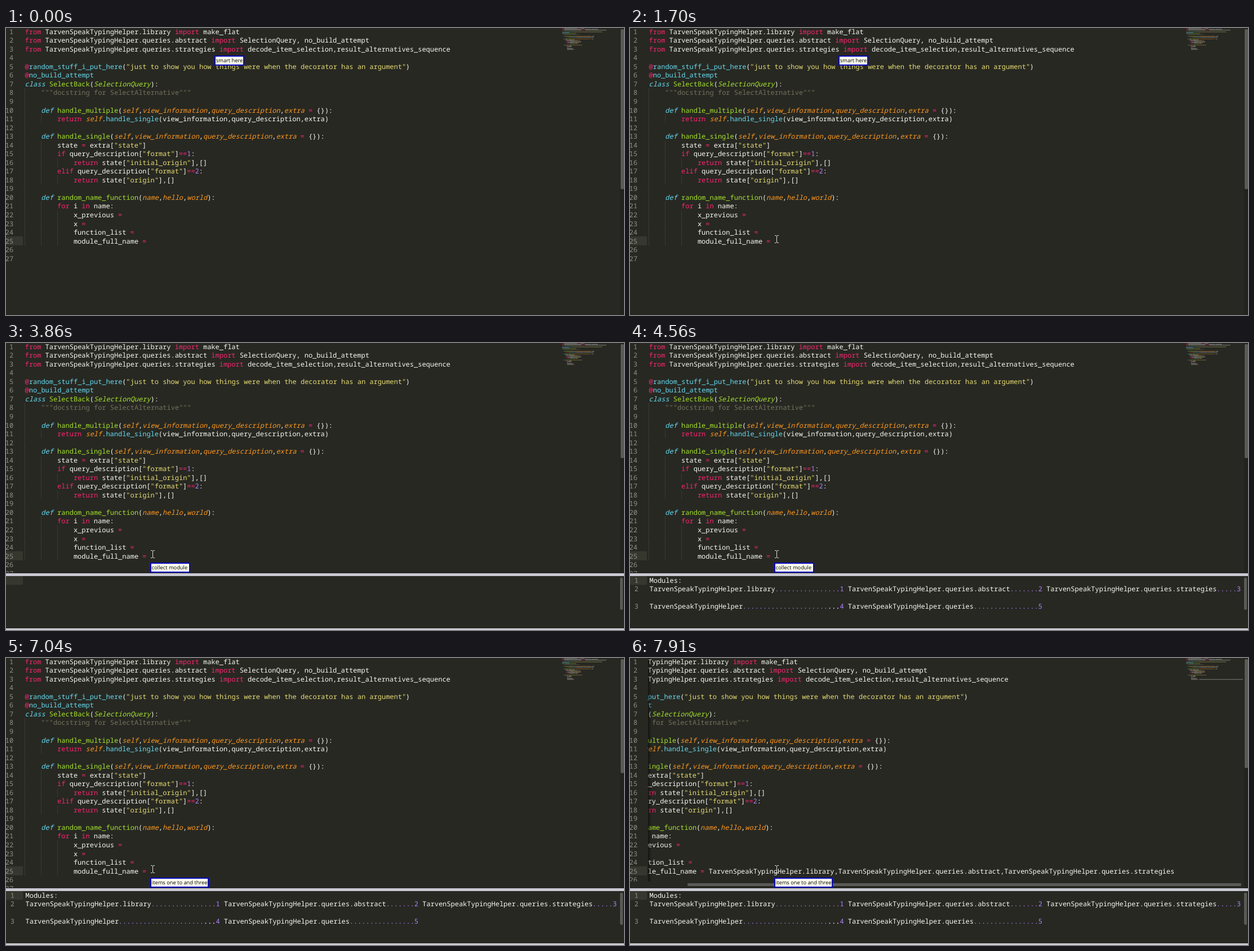
An HTML page for the animation above (8000 ms loop, 1097 by 511 pixels).

```html
<!DOCTYPE html>
<html lang="en">
<head>
<meta charset="utf-8">
<title>Editor</title>
<style>
  html, body { margin: 0; width: 100%; height: 100%; overflow: hidden; background: #272822; }
  svg { display: block; width: 100%; height: 100%; }
  text { font: 500 12px "Noto Sans Mono", "DejaVu Sans Mono", monospace; text-rendering: geometricPrecision; }
  .tip text { font: 9.3px "Open Sans", "Noto Sans", sans-serif; fill: #000; }
  .tip rect { fill: #ffffee; stroke: #0808c4; stroke-width: 2; }
  .tx { fill: #f8f8f2; }
  .kw { fill: #f92672; }
  .st { fill: #e6db74; }
  .cm { fill: #75715e; }
  .df, .cl { fill: #66d9ef; }
  .fn, .bs { fill: #a6e22e; }
  .pr { fill: #fd971f; }
  .nu { fill: #ae81ff; }
  .df, .bs, .pr { font-style: italic; }
  .num { fill: #90908a; text-anchor: end; }
  .bg { fill: #272822; }
  .active { fill: #36372f; }
  .thumb { fill: #5a5b56; }
  .bar { fill: #c9c9d3; }
  .guide { stroke: #4a4b44; stroke-dasharray: 1 1; }
  .map { opacity: .42; }
</style>
</head>
<body>
<svg id="stage" viewBox="0 0 1097 511">
  <defs>
    <clipPath id="codeClip"><rect x="31" y="0" width="956" height="511"/></clipPath>
    <clipPath id="mapClip"><rect x="987" y="0" width="101" height="60"/></clipPath>
    <linearGradient id="shade">
      <stop offset="0" stop-color="#000" stop-opacity=".5"/>
      <stop offset="1" stop-color="#000" stop-opacity="0"/>
    </linearGradient>
  </defs>
</svg>
<script>
const LOOP = 8000, CW = 7.19, ROW = 15.54, LEFT = 33.6;
const MAP_X = 987, MAP_CW = 0.75, MAP_ROW = 1.56;
const PKG = "TarvenSpeakTypingHelper";
const MODULES = [".library", ".queries.abstract", ".queries.strategies"].map(m => PKG + m);
const CODE = `from ${MODULES[0]} import make_flat
from ${MODULES[1]} import SelectionQuery, no_build_attempt
from ${MODULES[2]} import decode_item_selection,result_alternatives_sequence

@random_stuff_i_put_here("just to show you how things were when the decorator has an argument")
@no_build_attempt
class SelectBack(SelectionQuery):
    """docstring for SelectAlternative"""

    def handle_multiple(self,view_information,query_description,extra = {}):
        return self.handle_single(view_information,query_description,extra)

    def handle_single(self,view_information,query_description,extra = {}):
        state = extra["state"]
        if query_description["format"]==1:
            return state["initial_origin"],[]
        elif query_description["format"]==2:
            return state["origin"],[]

    def random_name_function(name,hello,world):
        for i in name:
            x_previous =
            x =
            function_list =
            module_full_name =

`.split("\n");
const TYPE_ROW = 24, TYPE_COL = 31;

const TOKEN = new RegExp([
  '(?<cm>""".*?""")',
  '(?<st>"[^"]*")',
  '(?<kw>\\b(?:from|import|return|if|elif|for|in)\\b|==?|@)',
  '(?<df>\\b(?:class|def)\\b)',
  '(?<fn>(?<=(?:class|def) )\\w+)',
  '(?<bs>(?<=class \\w+\\()\\w+)',
  '(?<pr>\\bself\\b|(?<=def .*[(,])\\w+)',
  '(?<cl>(?<=@|self\\.)\\w+)',
  '(?<nu>\\b\\d+\\b)',
  '(?<tx>\\w+|[^\\s\\w"@=]+)'
].join("|"), "g");

function add(parent, tag, attrs = {}, content = "") {
  const el = document.createElementNS("http://www.w3.org/2000/svg", tag);
  for (const key in attrs) el.setAttribute(key, attrs[key]);
  el.textContent = content;
  parent.appendChild(el);
  return el;
}
const group = (parent, attrs) => add(parent, "g", attrs);
const box = (parent, cls, x, y, width, height, more) =>
  add(parent, "rect", { class: cls, x, y, width, height, ...more });
const label = (parent, cls, x, y, str) => add(parent, "text", { class: cls, x, y }, str);
const show = (el, on) => el.setAttribute("visibility", on ? "visible" : "hidden");

// Baselines sit on whole pixels
const codeY = row => Math.round(10.7 + row * ROW);
const panelY = row => Math.round(426.6 + row * ROW);

// Draws one highlighted line, full size and in the overview
function drawLine(line, row, col, big, small) {
  for (const m of line.matchAll(TOKEN)) {
    const cls = Object.keys(m.groups).find(k => m.groups[k] !== undefined);
    const at = col + m.index;
    label(big, cls, LEFT + at * CW, codeY(row), m[0]);
    box(small, cls, MAP_X + at * MAP_CW, 0.2 + row * MAP_ROW, m[0].length * MAP_CW, 1);
  }
}

const stage = document.getElementById("stage");
box(stage, "bg", 0, 0, 1097, 511);

// Code pane
const codeView = group(stage, { "clip-path": "url(#codeClip)" });
const code = group(codeView);
const map = group(stage, { class: "map", "clip-path": "url(#mapClip)" });
const indentOf = row => {
  while (row < CODE.length && !CODE[row]) row++;
  return row < CODE.length ? CODE[row].search(/\S/) : 0;
};
CODE.forEach((line, row) => {
  for (let col = 0; col < indentOf(row); col += 4) {
    const x = Math.round(LEFT + col * CW) + 0.5 - (col ? 0 : 1);
    add(code, "line", { class: "guide", x1: x, x2: x, y1: codeY(row) - 12, y2: codeY(row + 1) - 12 });
  }
  drawLine(line, row, 0, code, map);
});
const typed = group(code), typedMap = group(map);
const inserted = MODULES.join(",");
drawLine(inserted, TYPE_ROW, TYPE_COL, typed, typedMap);
const caret = box(code, "tx", 0, 370, 1.5, 17);

const leftShade = box(stage, "", 32, 0, 6, 410, { fill: "url(#shade)" });
const rightShade = box(stage, "", -987, 0, 6, 410, { fill: "url(#shade)", transform: "scale(-1 1)" });

// Gutter
box(stage, "active", 0, 371, 30, 16);
CODE.forEach((_, row) => label(stage, "num", 13.2, codeY(row), row + 1));

// Scroll bars
box(stage, "", 1090, 0, 7, 511, { fill: "#22231e" });
const vThumb = box(stage, "thumb", 1091, 2, 6, 285, { rx: 2 });
const hBar = group(stage);
box(hBar, "bg", 0, 398, 1090, 12);
const hThumb = box(hBar, "thumb", 49, 401, 983, 5, { rx: 2 });

// Result panel
const panel = group(stage);
box(panel, "bg", 0, 409, 1097, 102);
box(panel, "bar", 0, 410, 1097, 5);
box(panel, "bar", 0, 508, 1097, 3);
box(panel, "active", 0, 415, 30, 15.5);
box(panel, "thumb", 1090, 418, 5, 57, { rx: 2 });
const results = group(panel);
const panelX = col => 34.5 + col * CW;
[0, 1, 3].forEach((row, i) => label(results, "num", 15, panelY(row), i + 1));
label(results, "tx", panelX(0), panelY(0), "Modules:");
function drawEntry(name, row, col, index) {
  const start = col + name.length, end = col + 47;
  label(results, "tx", panelX(col), panelY(row), name);
  label(results, "nu", panelX(start), panelY(row), ".".repeat(end - start));
  label(results, "nu", panelX(end), panelY(row), index);
}
MODULES.forEach((name, i) => drawEntry(name, 1, i * 49, i + 1));
drawEntry(PKG, 3, 0, 4);
drawEntry(PKG + ".queries", 3, 49, 5);
label(results, "tx", panelX(44), panelY(3), "...");

// Voice bubbles, status square and pointer
function bubble(str, x, y, width) {
  const g = group(stage, { class: "tip" });
  box(g, "", x + 1, y + 1, width - 2, 16);
  label(g, "", x + 2.8, y + 12, str);
  return g;
}
const bubbles = [
  { el: bubble("smart here", 370, 49, 53), from: 0, to: 2150 },
  { el: bubble("collect module", 256, 391, 71), from: 3690, to: 5330 },
  { el: bubble("items one to and three", 256, 391, 104), from: 6900, to: LOOP }
];
const badge = box(stage, "", 256, 391, 13, 13, { fill: "#fff" });
const pointer = add(stage, "path", {
  d: "M-3 -6.5H-1L.5 -5.5L2 -6.5H4M.5 -5.5V5.5M-3 6.5H-1L.5 5.5L2 6.5H4",
  fill: "none", stroke: "#dededa", "stroke-width": 1
});

// Rows are [time, value...]
const POINTER = [[70, 610, 411], [140, 414, 405], [370, 414, 405], [910, 223, 376], [1080, 223, 376], [1290, 260, 376]];
const CARET = [[0, 0], [1080, 0], [1290, 1], [1540, 1], [1700, 0], [2070, 0], [2300, 1], [2620, 1], [2770, 0],
  [3080, 0], [3400, 1], [3690, 1], [3860, 0], [3930, 0], [4010, 1], [4420, 1], [4560, 0], [5110, 0], [5180, 1],
  [5570, 1], [5670, 0], [6100, 0], [6270, 1], [6580, 1], [6730, 0], [7189, 0], [7190, 1], [7740, 1], [7910, 0]];
const SCROLL = [[0, 0], [7190, 64], [7280, 104], [7360, 117]];

const keyAt = (keys, t) => Math.max(0, keys.findLastIndex(k => k[0] <= t));
function tween(keys, t) {
  const i = keyAt(keys, t), a = keys[i], b = keys[i + 1];
  if (!b || t < a[0]) return a.slice(1);
  const p = (t - a[0]) / (b[0] - a[0]);
  return a.slice(1).map((v, n) => v + (b[n + 1] - v) * p);
}
function pointerAt(t) {
  if (t < 370) return POINTER[keyAt(POINTER, t)].slice(1);
  const beat = t < 910 ? 77 : 70;
  const start = t < 910 ? 370 : 1080;
  return tween(POINTER, t < 1290 ? start + Math.ceil((t - start) / beat) * beat : t);
}

function draw(t) {
  const open = t >= 3860, filled = t >= 7190;
  const scroll = SCROLL[keyAt(SCROLL, t)][1];

  code.setAttribute("transform", `translate(${-scroll} 0)`);
  [typed, typedMap, leftShade, hBar].forEach(el => show(el, filled));
  show(rightShade, filled && scroll < 117);
  hThumb.setAttribute("x", scroll - 15);
  vThumb.setAttribute("height", filled ? 194 : open ? 203 : 285);

  caret.setAttribute("x", LEFT - 0.4 + (TYPE_COL + (filled ? inserted.length : 0)) * CW);
  caret.setAttribute("opacity", tween(CARET, t)[0]);

  show(panel, open);
  results.setAttribute("opacity", t >= 3930 ? 1 : 0);
  bubbles.forEach(b => show(b.el, t >= b.from && t < b.to));
  show(badge, (t >= 2230 && t < 3690) || (t >= 5330 && t < 6900));

  show(pointer, t >= 70);
  const [x, y] = pointerAt(t).map(Math.round);
  pointer.setAttribute("transform", `translate(${x} ${y})`);
}

function tick() {
  draw(performance.now() % LOOP);
  requestAnimationFrame(tick);
}
tick();
</script>
</body>
</html>
```
